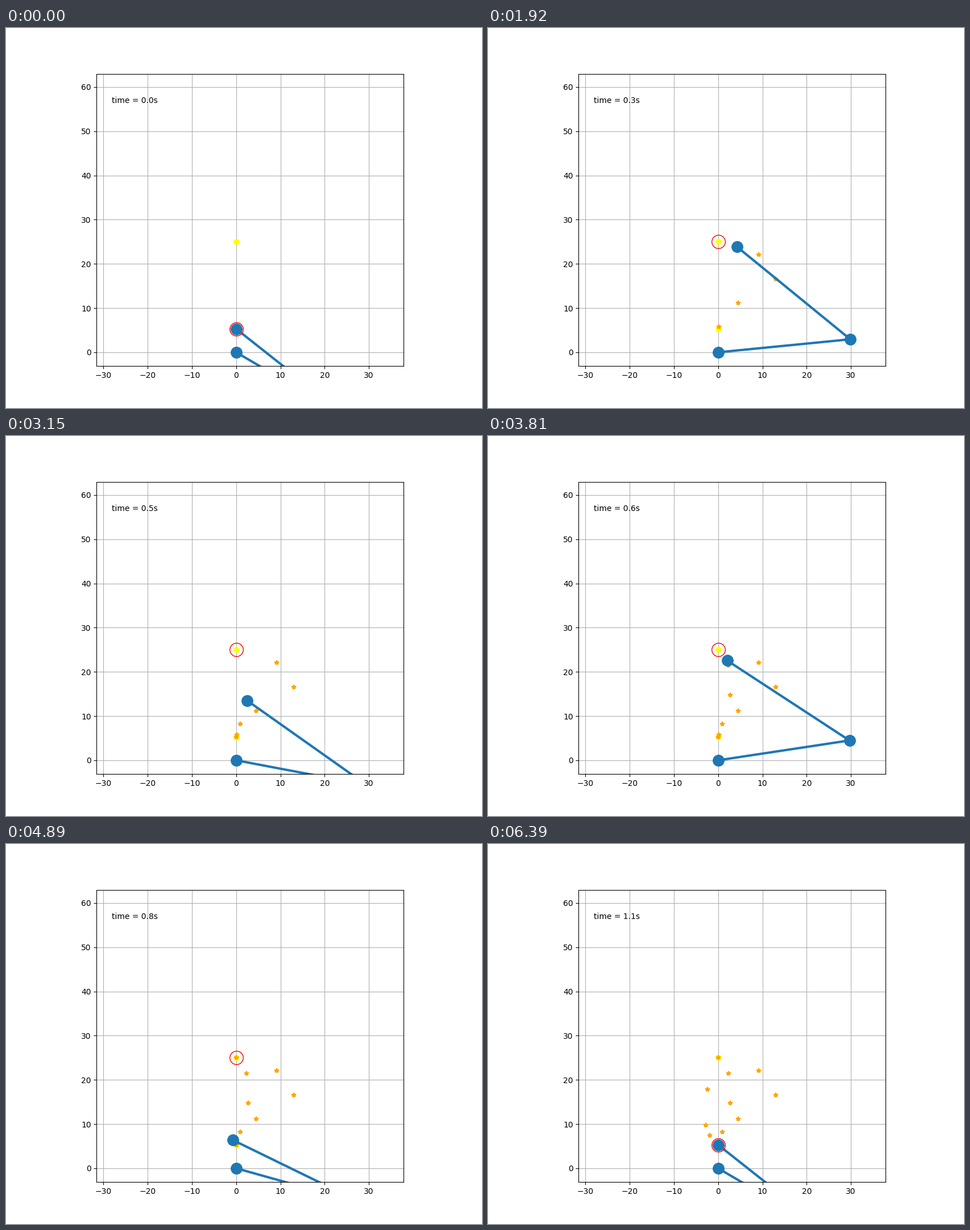
Animation, 837 px wide and 669 px high, one loop 6540 ms. Source, as a matplotlib script:

```python
import numpy as np
import matplotlib.pyplot as plt
from matplotlib.animation import FuncAnimation

WIDTH, HEIGHT = 837, 669
UPPER, FORE = 30, 33          # link lengths
REACH = UPPER + FORE
TRIAL_STEPS, HOLD, KEY_STEPS = 71, 5, 11
FRAMES = 3 * TRIAL_STEPS + HOLD
START, GOAL = (0, 5.3), (0, 25)

# Hand key positions of each reach, one every KEY_STEPS steps
REACHES = [np.array([START, *points], float) for points in (
    [(0.6, 6.5), (4, 10.8), (10.8, 14.9), (13.6, 18), (9.2, 22.1), (0, 25)],
    [(0.4, 6.5), (1.5, 10), (2.8, 14.8), (2.7, 19.3), (1.7, 23.5), (0, 25)],
    [(-0.1, 5.6), (-1.4, 7.1), (-2.4, 7.9), (-2.8, 10.1), (-2.5, 15.2), (-2.2, 21.4)],
)]


def smooth_path(keys, s):
    """Point s key intervals along a smooth curve that starts and ends at rest."""
    slope = np.gradient(keys, axis=0)
    slope[[0, -1]] = 0
    i = min(int(s), len(keys) - 2)
    u = s - i
    ease = u * u * (3 - 2 * u)
    return (keys[i] + ease * (keys[i + 1] - keys[i])
            + u * (1 - u) * ((1 - u) * slope[i] - u * slope[i + 1]))


def hand_at(frame):
    trial, step = divmod(frame, TRIAL_STEPS)
    return smooth_path(REACHES[trial % 3], max(step - HOLD + 1, 0) / KEY_STEPS)


def elbow_for(hand):
    x, y = hand
    d = np.hypot(x, y)
    bend = np.arccos((UPPER ** 2 + d ** 2 - FORE ** 2) / (2 * UPPER * d))
    angle = np.arctan2(y, x) - bend
    return UPPER * np.cos(angle), UPPER * np.sin(angle)


# A star is dropped every 16 simulated steps; each trial shows one extra frame
star_frames = [n + n // 70 for n in range(11, 210, 16)]
star_points = np.array([hand_at(f) for f in star_frames])

fig = plt.figure(figsize=((WIDTH + 0.001) / 100, (HEIGHT + 0.001) / 100), dpi=100)
unit = 7.784                  # pixels per data unit
ax = fig.add_axes((159.47 / WIDTH, 73.55 / HEIGHT,
                   1.1 * REACH * unit / WIDTH, 1.05 * REACH * unit / HEIGHT),
                  autoscale_on=False,
                  xlim=(-0.5 * REACH, 0.6 * REACH), ylim=(-0.05 * REACH, REACH))
ax.grid()

ax.plot(*zip(START, GOAL), "o", color="yellow", mew=1.5)
stars, = ax.plot([], [], "*", color="orange", mew=1.5)
arm, = ax.plot([], [], "o-", color="tab:blue", lw=3, ms=14)
target, = ax.plot([], [], "o", color="red", ms=17, fillstyle="none")
clock = ax.text(0.05, 0.9, "", transform=ax.transAxes)


def update(frame):
    trial, step = divmod(frame, TRIAL_STEPS)
    hand = hand_at(frame)
    arm.set_data(*zip((0, 0), elbow_for(hand), hand))
    shown = np.searchsorted(star_frames, frame, side="right")
    stars.set_data(*star_points[:shown].T)
    x, y = START if step < HOLD else GOAL
    target.set_data([x], [y])
    clock.set_text(f"time = {0.35 * trial + 0.00499 * step + 1e-4:.1f}s")
    return stars, arm, target, clock


anim = FuncAnimation(fig, update, frames=FRAMES, interval=30,
                     repeat=True, repeat_delay=0)
plt.show()
```
